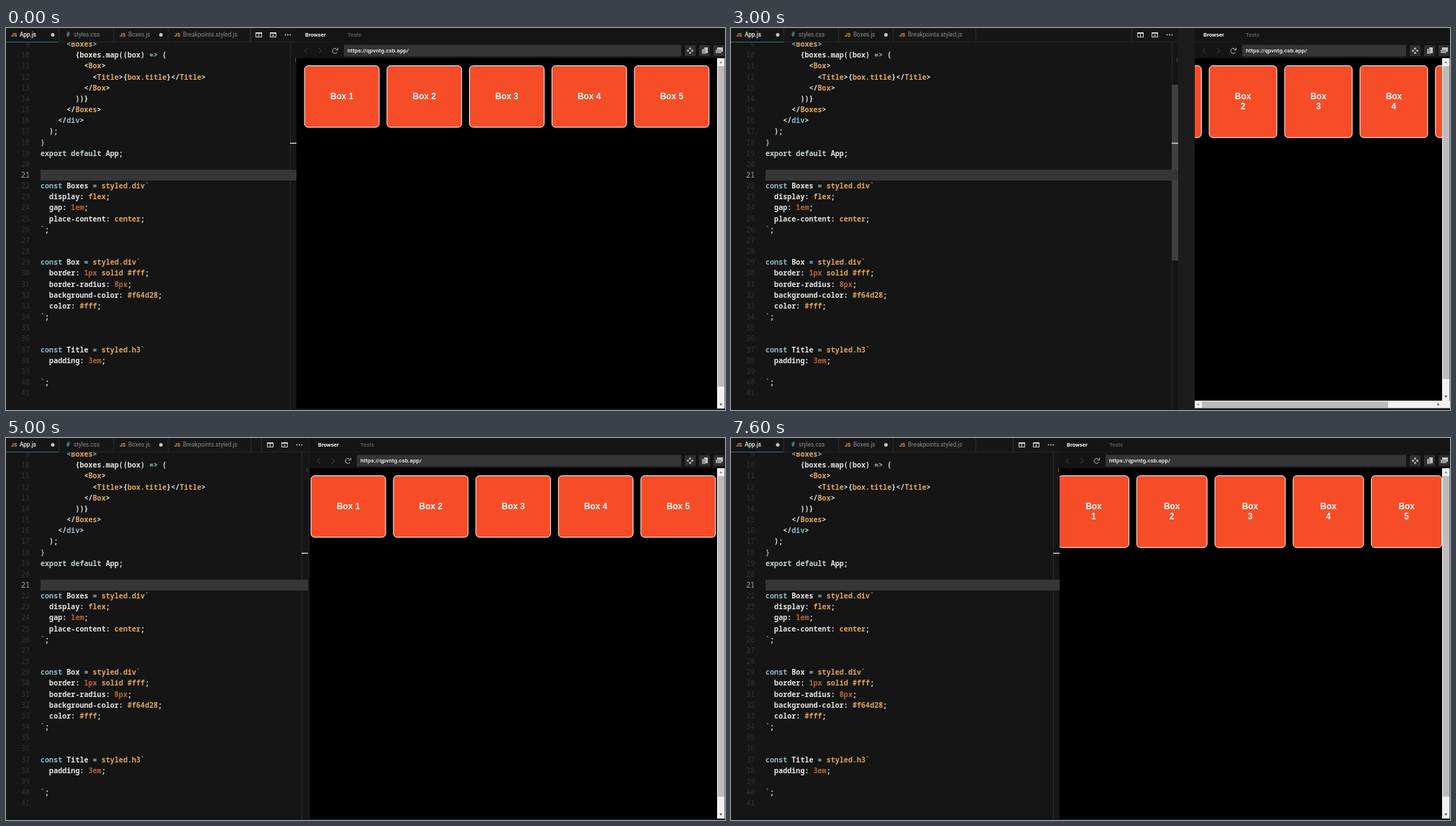
These frames come from a looping animation (1000 by 531 pixels, 8.2 s). An HTML page with a canvas:

```html
<!DOCTYPE html>
<html lang="en">
<head>
<meta charset="utf-8">
<title>Resizing the preview</title>
<style>
html, body { margin: 0; height: 100%; overflow: hidden; background: #151515; }
canvas { display: block; }
</style>
</head>
<body>
<canvas id="stage" width="1000" height="531"></canvas>
<script>
const ctx = document.getElementById('stage').getContext('2d');
const LOOP = 8200, STEP = 100, LAG = 38, MOVE_END = 7600;
const UI = 'Roboto, sans-serif';
const MONO = '"Noto Sans Mono", "DejaVu Sans Mono", monospace';
const BOX_FONT = 'bold 11.9px "Liberation Sans", Arial, sans-serif';
const VIEW_RIGHT = 989, VIEW_TOP = 42, VIEW_BOTTOM = 529;

// Divider path: time, x, speed in px per 100 ms
const PATH = [
  [0, 404, 0], [100, 404, 0], [600, 420, 0], [700, 420, 0],
  [2300, 514, 11], [2600, 530, 0], [2700, 530, 0], [3400, 822, 0],
  [3700, 753, -47], [4300, 474, -47], [4600, 415, 0], [5100, 430, 10],
  [5600, 581, 82], [6150, 780, 0], [6600, 626.5, -45], [7600, 455, -5]
];

const INK = { w: '#e4e4e2', b: '#8fb7c6', o: '#dfa65f', n: '#b4643a', p: '#c3d0d4' };

// Each line alternates an ink key and its text
const FIRST_LINE = 9;
const CODE = [
  'b|      <|o|Boxes|b|>',
  'w|        {boxes.map((box) |b|=>|w| (',
  'w|          <|o|Box|w|>',
  'w|            <|o|Title|w|>{|o|box.title|w|}</|o|Title|w|>',
  'w|          </|o|Box|w|>',
  'w|        ))}',
  'w|      </|o|Boxes|w|>',
  'w|    </|b|div|w|>',
  'w|  );',
  'b|}',
  'p|export default |w|App;',
  '', '',
  'b|const |w|Boxes |b|= |o|styled.div`',
  'w|  display: |o|flex|w|;',
  'w|  gap: |n|1em|w|;',
  'w|  place-content: |o|center|w|;',
  'o|`|w|;',
  '', '',
  'b|const |w|Box |b|= |o|styled.div`',
  'w|  border: |n|1px |o|solid #fff|w|;',
  'w|  border-radius: |n|8px|w|;',
  'w|  background-color: |o|#f64d28|w|;',
  'w|  color: |o|#fff|w|;',
  'o|`|w|;',
  '', '',
  'b|const |w|Title |b|= |o|styled.h3`',
  'w|  padding: |n|3em|w|;',
  '',
  'o|`|w|;',
  ''
].map(line => line.split('|'));

function dividerAt(t) {
  t = Math.max(0, Math.min(t, MOVE_END));
  let i = 1;
  while (PATH[i][0] < t) i++;
  const [t0, x0, v0] = PATH[i - 1], [t1, x1, v1] = PATH[i];
  const d = t1 - t0, u = (t - t0) / d, k = d / 100;
  const u2 = u * u, u3 = u2 * u;
  return x0 * (2 * u3 - 3 * u2 + 1) + v0 * k * (u3 - 2 * u2 + u)
       + x1 * (3 * u2 - 2 * u3) + v1 * k * (u3 - u2);
}

function rect(x, y, w, h, color) {
  ctx.fillStyle = color;
  ctx.fillRect(x, y, w, h);
}

function text(str, x, y, color, font, align = 'left') {
  ctx.font = font;
  ctx.fillStyle = color;
  ctx.textAlign = align;
  ctx.fillText(str, x, y);
}

function dot(x, y, r, color) {
  ctx.fillStyle = color;
  ctx.beginPath();
  ctx.arc(x, y, r, 0, 7);
  ctx.fill();
}

function line(color, width, ...points) {
  ctx.strokeStyle = color;
  ctx.lineWidth = width;
  ctx.beginPath();
  points.forEach(([x, y]) => ctx.lineTo(x, y));
  ctx.stroke();
}

function frame(x, y, w, h, color) {
  ctx.strokeStyle = color;
  ctx.lineWidth = 1;
  ctx.strokeRect(x + .5, y + .5, w - 1, h - 1);
}

function triangle(x, y, dx, dy, color) {
  ctx.fillStyle = color;
  ctx.beginPath();
  ctx.moveTo(x + dx * 2, y + dy * 2);
  ctx.lineTo(x - dx - dy * 2, y - dy - dx * 2);
  ctx.lineTo(x - dx + dy * 2, y - dy + dx * 2);
  ctx.fill();
}

function clipped(x, y, w, h, draw) {
  ctx.save();
  ctx.beginPath();
  ctx.rect(x, y, w, h);
  ctx.clip();
  draw();
  ctx.restore();
}

function drawTabs(edge) {
  const font = '8.2px ' + UI, badge = 'bold 7px ' + UI;
  rect(0, 0, edge, 20, '#161616');
  for (const x of [73, 149, 225, 340]) rect(x, 0, 1, 19, '#2b2b2b');
  rect(0, 19, edge, 1, '#252525');
  rect(0, 19, 73, 1, '#2a6f8a');
  for (const x of [7, 158, 234]) text('JS', x, 11.5, '#d9a050', badge);
  text('#', 84, 12, '#5f9fb8', 'bold 8.2px ' + UI);
  text('App.js', 19, 12, '#f2f2f2', '500 ' + font);
  text('styles.css', 94, 12, '#8a8a8a', font);
  text('Boxes.js', 170, 12, '#8a8a8a', font);
  text('Breakpoints.styled.js', 246, 12, '#8a8a8a', font);
  dot(65, 9.5, 2.5, '#c4c4c4');
  dot(215.5, 9.5, 2.5, '#c4c4c4');

  rect(edge - 65, 0, 1, 19, '#2b2b2b');
  frame(edge - 57, 6, 9, 7, '#d0d0d0');
  rect(edge - 57, 6, 9, 2, '#d0d0d0');
  rect(edge - 53, 6, 1, 7, '#d0d0d0');
  frame(edge - 37, 6, 9, 7, '#d0d0d0');
  rect(edge - 37, 6, 9, 2, '#d0d0d0');
  triangle(edge - 32.5, 10.3, .8, 0, '#d0d0d0');
  for (let i = 0; i < 3; i++) dot(edge - 15.5 + i * 3.4, 9.5, .9, '#d0d0d0');
}

function drawEditor(edge, seam) {
  rect(0, 0, edge, 531, '#151515');
  rect(seam, 20, 1, 511, '#292929');
  if (edge > 500) rect(edge - 9, 79, 9, 244, '#404040');
  rect(48, 197, edge - 48, 15, '#363636');
  CODE.forEach((parts, i) => {
    const n = FIRST_LINE + i, y = 208 + (n - 21) * 15.16;
    text(n, 33, y, n === 21 ? '#a5a5a5' : '#353535', '10.08px ' + MONO, 'right');
    let x = 48;
    for (let j = 0; j + 1 < parts.length; j += 2) {
      const weight = parts[j] === 'w' ? 650 : 550;
      text(parts[j + 1], x, y, INK[parts[j]], `${weight} 10.08px ${MONO}`);
      x += ctx.measureText(parts[j + 1]).width;
    }
  });
  rect(edge - 9, 159.5, 9, 1.5, '#c9c9c9');
  rect(edge - 2, 42, 1, 5, '#555');
  drawTabs(edge);
}

function drawToolbar(left) {
  rect(left, 0, 1000 - left, VIEW_TOP, '#141414');
  rect(left, 19, 1000 - left, 1, '#1d1d1d');
  text('Browser', left + 12, 11.5, '#f4f4f4', 'bold 7.8px ' + UI);
  text('Tests', left + 71, 11.5, '#777', '7.8px ' + UI);
  line('#444', 1, [left + 15, 28], [left + 11, 31.5], [left + 15, 35]);
  line('#444', 1, [left + 31, 28], [left + 35, 31.5], [left + 31, 35]);
  ctx.strokeStyle = '#bbb';
  ctx.lineWidth = 1;
  ctx.beginPath();
  ctx.arc(left + 53.5, 31.8, 3.5, .5, 5.4);
  ctx.stroke();
  line('#bbb', 1, [left + 57.5, 27.5], [left + 57.5, 30.5], [left + 54.5, 30.5]);
  rect(left + 66, 23.5, 939 - left - 66, 16, '#353535');
  text('https://qpvntg.csb.app/', left + 71, 34.3, '#f5f5f5', '500 8.1px ' + UI);

  for (const x of [944, 964, 984]) rect(x, 24, 15, 15, '#303030');
  for (const [dx, dy] of [[0, -3], [3, 0], [0, 3], [-3, 0]]) dot(951.5 + dx, 31.5 + dy, 1.5, '#b5b5b5');
  rect(971, 27, 5, 8, '#c5c5c5');
  rect(968, 29, 5, 7, '#999');
  rect(989, 27, 8, 6, '#c5c5c5');
  rect(987, 30, 8, 5, '#999');
}

function drawPage(left, cover) {
  const gap = 10.1, minBox = 94.8, maxBox = 104.6;
  const width = VIEW_RIGHT - left;
  const boxW = Math.max(minBox, Math.min(maxBox, (width - 4 * gap) / 5));
  const total = 5 * boxW + 4 * gap;
  const oneLine = boxW === maxBox, scrolls = total > width + 1;
  const start = left + (width - total) / 2;
  const bottom = scrolls ? 518 : VIEW_BOTTOM;
  const stale = cover - left > 4;
  const right = stale ? 999 - (cover - left) : VIEW_RIGHT;

  rect(left, VIEW_TOP, 1000 - left, VIEW_BOTTOM - VIEW_TOP, '#000');
  clipped(left, VIEW_TOP, right - left, bottom - VIEW_TOP, () => {
    for (let i = 0; i < 5; i++) {
      const x = start + i * (boxW + gap), mid = x + boxW / 2;
      ctx.beginPath();
      ctx.roundRect(x + .4, 52.5, boxW - .8, oneLine ? 85.5 : 99.8, 5);
      ctx.fillStyle = '#f64d28';
      ctx.fill();
      ctx.strokeStyle = '#fff';
      ctx.lineWidth = 1;
      ctx.stroke();
      if (oneLine) {
        text('Box ' + (i + 1), mid, 99.3, '#fff', BOX_FONT, 'center');
      } else {
        text('Box', mid, 99.3, '#fff', BOX_FONT, 'center');
        text(i + 1, mid, 113.2, '#fff', BOX_FONT, 'center');
      }
    }
  });

  if (stale) {
    rect(right, VIEW_TOP, 1000 - right, (scrolls ? 518 : 531) - VIEW_TOP, '#fff');
  } else {
    const track = bottom - VIEW_TOP - 22;
    rect(VIEW_RIGHT, VIEW_TOP, 10.5, bottom - VIEW_TOP, '#f1f1f1');
    rect(VIEW_RIGHT + 1, 53, 9, track * .958, '#bcbcbc');
    triangle(994.3, 48, 0, -1, '#888');
    triangle(994.3, bottom - 6, 0, 1, '#505050');
  }
  if (scrolls) {
    const track = 978 - left - 10;
    rect(left, 518, 1000 - left, 10.5, '#f1f1f1');
    rect(left + 10, 519, track * width / ((width + total) / 2), 9, '#bcbcbc');
    triangle(left + 5, 523.3, -1, 0, '#999');
    triangle(983.5, 523.3, 1, 0, '#505050');
  }
}

function render(t) {
  const left = Math.round(dividerAt(t)), edge = Math.round(dividerAt(t - LAG));
  const movingLeft = edge - left > 4;
  rect(0, 0, 1000, 531, '#1c1c1c');
  drawToolbar(left);
  drawPage(left, edge);
  rect(left, VIEW_BOTTOM, movingLeft ? 982 - left : 1000 - left, 2, '#151515');
  clipped(0, 0, edge, 531, () => drawEditor(edge, movingLeft ? left : edge - 9));
}

function tick() {
  const t = performance.now() % LOOP;
  render(Math.min(Math.floor(t / STEP) * STEP, MOVE_END));
  requestAnimationFrame(tick);
}
tick();
</script>
</body>
</html>
```
